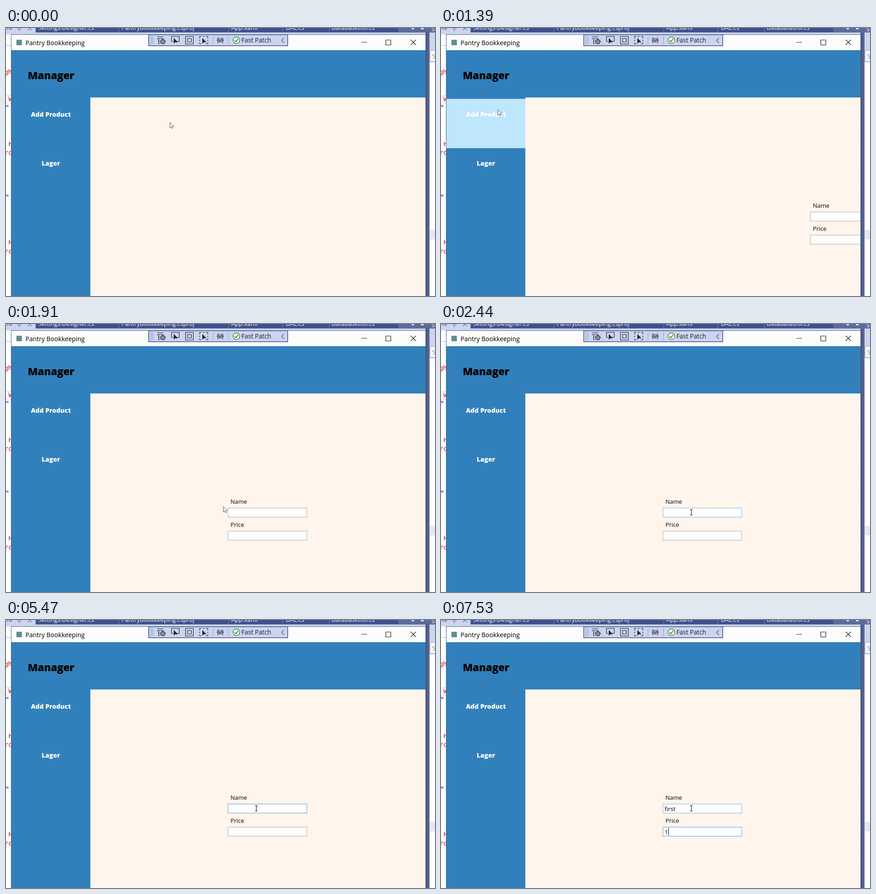
These frames come from a looping animation (946 by 592 pixels, 8 s). An HTML page:

```html
<!DOCTYPE html>
<html lang="en">
<head>
<meta charset="utf-8">
<title>Add product form</title>
<style>
  html, body { margin: 0; width: 100%; height: 100%; overflow: hidden; background: #fff; }
  svg { display: block; width: 946px; height: 592px; }
  text { font: 13.1px "Open Sans", "Noto Sans", sans-serif; white-space: pre; }
  .bold text { font-weight: 800; font-size: 14px; fill: #fff; text-anchor: middle; }
  .bold .heading { font-size: 23px; fill: #000; text-anchor: start; letter-spacing: -.4px; }
  .tabs text { font-size: 13.2px; fill: #fff; }
  .code text { font: 14px "Liberation Mono", monospace; fill: #e00000; text-anchor: end; }
  .code .quote { fill: #1010d0; }
  .line { fill: none; stroke: #222; stroke-width: 1.2; }
  .field { fill: #fff; stroke: #abadb3; }
</style>
</head>
<body>
<svg viewBox="0 0 946 592">
  <defs>
    <linearGradient id="shadow">
      <stop stop-color="#48547f"/>
      <stop offset="1" stop-color="#5d6b99"/>
    </linearGradient>
  </defs>
  <rect width="946" height="592" fill="#fff"/>

  <!-- editor behind the window -->
  <rect width="946" height="14" fill="#5d6b99"/>
  <g class="tabs">
    <rect width="65" height="10" fill="#ccd5f0"/>
    <path d="M66 0h182v9H66zM250 0h240v9H250zM492 0h117v9H492zM611 0h101v9H611zM714 0h151v9H714z" fill="#40508d"/>
    <rect y="10" width="925" height="4" fill="#ccd5f0"/>
    <text x="-2" y="4" style="fill:#222">ml</text>
    <path class="line" d="M25 2h9M29.500 2v5M48 -4l9 9m0-9l-9 9" style="stroke:#667"/>
    <text x="71" y="4">Settings.Designer.cs</text>
    <text x="255" y="4">PantryBookkeeping.csproj</text>
    <text x="497" y="4">App.xaml</text>
    <text x="617" y="4">DAL.cs</text>
    <text x="718" y="4">DatabaseUtil.cs</text>
    <path d="M893 0h8l-4 4zM915 0h6v3h-6z" fill="#dce2f5"/>
  </g>
  <path d="M0 38.500h11" stroke="#a9b3d3"/>
  <rect x="-4" y="149.500" width="20" height="16" fill="none" stroke="#ccc"/>
  <g class="code">
    <text x="13" y="102">gh</text>
    <text x="14" y="162">W</text>
    <text x="7" y="181" class="quote">"</text>
    <text x="14" y="261">H</text>
    <text x="14" y="280">ro</text>
    <text x="7" y="379" class="quote">"</text>
    <text x="14" y="478">H</text>
    <text x="14" y="498">ro</text>
  </g>

  <!-- application window -->
  <rect x="11" y="14" width="914" height="35" fill="#fcfcfc"/>
  <path d="M11 14.500H925" stroke="#55608a"/>
  <rect x="23" y="26" width="12" height="12" fill="#5f8f90"/>
  <text x="43" y="37.500" style="font-size:14px">Pantry Bookkeeping</text>
  <path class="line" d="M784 31.500h12M837.500 26.500h11v11h-11zM892.500 26l11.500 11.500m0-11.500l-11.500 11.500"/>
  <rect x="11" y="49" width="914" height="543" fill="#3180bc"/>
  <rect x="186" y="153.500" width="739" height="439" fill="#fff5ec"/>
  <rect id="highlight" x="12" y="156.500" width="174" height="109" fill="#bee6fd"/>
  <g class="bold">
    <text x="48" y="113" class="heading">Manager</text>
    <text x="99" y="195.500">Add Product</text>
    <text x="99" y="303.500">Lager</text>
  </g>
  <path d="M11.500 14V592" stroke="#3f6288"/>

  <g id="form">
    <text x="6" y="397">Name</text>
    <rect id="nameBox" class="field" x=".5" y="406.500" width="174" height="20"/>
    <text id="nameText" x="4" y="422"></text>
    <text x="6" y="448">Price</text>
    <rect id="priceBox" class="field" x=".5" y="457.500" width="174" height="20"/>
    <text id="priceText" x="4" y="473"></text>
    <path id="caret" d="M0 0v17" stroke="#000"/>
  </g>

  <!-- right edge -->
  <rect x="925" y="10" width="9" height="582" fill="url(#shadow)"/>
  <rect x="934" y="76" width="12" height="516" fill="#fff"/>
  <rect x="934" y="10" width="12" height="66" fill="#ccd5f0"/>
  <rect x="935.500" y="49.500" width="14" height="24" fill="#fff" stroke="#a0a8c4"/>
  <rect x="934" y="446" width="12" height="21" fill="#e6e7ec"/>
  <text x="938" y="7" fill="#fff">S</text>
  <text x="940" y="67" fill="#777">S</text>

  <!-- floating toolbar -->
  <rect x="314.750" y="14.750" width="306.500" height="24.500" fill="#ccd5f0" stroke="#40508d" stroke-width="1.5"/>
  <path d="M319 18v19M323 18v19M321 20v16M325 20v16" stroke="#7583ad" stroke-dasharray="1.500 2.500" stroke-width="1.200"/>
  <g class="line" stroke-linejoin="round">
    <path d="M333 19.500h14M333 23.500h14M336.500 24v10.500h4M337 29h3"/>
    <circle cx="346" cy="30" r="3.700"/>
    <circle cx="346" cy="30" r="5" stroke-width="2" stroke-dasharray="2 1.930"/>
    <circle cx="346" cy="30" r=".800"/>
    <path d="M369 29.500h-4v-11h17v11h-5"/>
    <path d="M396 18.500h17v17h-17zM400.500 23h8v8h-8z"/>
    <path d="M427 23v-4.500h4M434 18.500h4M441 18.500h4V23M427 26v3M445 26v3M427 32v3h4M441 35h4v-3"/>
    <path d="M469 21q-2 0-2 2v2q0 2-2 2q2 0 2 2v2q0 2 2 2M476 21q2 0 2 2v2q0 2 2 2q-2 0-2 2v2q0 2-2 2"/>
    <circle cx="472.500" cy="27" r="3.600"/>
    <path d="M470.500 27l1.500 1.500 3-3"/>
  </g>
  <path d="M370 22v13l3-3.500h6zM433 22v13l3-3.500h6z" fill="#222"/>
  <path d="M456.500 19v16M490.500 19v16" stroke="#8d99bf"/>
  <circle cx="508" cy="27" r="7.300" fill="#fff" stroke="#388a34" stroke-width="1.400"/>
  <path d="M504 27l3 3.500 5-7" fill="none" stroke="#388a34" stroke-width="2"/>
  <text x="519" y="32" style="font-size:13.800px" fill="#1e1e1e">Fast Patch</text>
  <path class="line" d="M613 22l-5.500 5.500 5.500 5.500" style="stroke:#40508d"/>

  <path id="arrow" d="M.5 .5V12.500L3.300 10 5.200 14 7 13.200 5.200 9.200H9Z" fill="#fff" stroke="#334" stroke-width=".8"/>
  <path id="beam" d="M-3 -6h2.200l.8.800.8-.800H3M0 -5.500v11M-3 6h2.200l.8-.800.8.800H3" fill="none" stroke="#111" stroke-width="1.200"/>
</svg>
<script>
const LOOP = 8000;
const HOVER = "#7eb4ea", FOCUS = "#569de5", IDLE = "#abadb3";

// [time, x, y] of the pointer; each position holds until the next
const pointerStops = [
  [0, 361, 208], [400, 228, 182], [550, 132, 177], [700, 125, 180],
  [1780, 300, 290], [1910, 479, 403], [2030, 517, 440], [2320, 545, 418], [2440, 552, 416]
];
const blinkTimes = [3470, 3910, 4460, 5040, 5470, 5850];
const keyTimes = [5850, 6000, 6150, 6300, 6820];

const byId = id => document.getElementById(id);
const [highlight, form, nameBox, nameText, priceBox, priceText, caret, arrow, beam] =
  ["highlight", "form", "nameBox", "nameText", "priceBox", "priceText", "caret", "arrow", "beam"].map(byId);

const passed = (times, t) => times.filter(time => time <= t).length;
const show = (node, on) => node.setAttribute("visibility", on ? "visible" : "hidden");
const move = (node, x, y) => node.setAttribute("transform", `translate(${x} ${y})`);
const textEnd = node => node.textContent ? node.getComputedTextLength() : 0;

function render(t) {
  const [, x, y] = pointerStops.findLast(stop => stop[0] <= t);
  const overField = t >= 2320;
  const typing = t >= 5850 && t < 6940;
  move(arrow, x, y);
  move(beam, x, y);
  show(arrow, !overField);
  show(beam, overField && !typing);
  show(highlight, t >= 550 && t < 1780);

  form.style.display = t >= 1390 ? "" : "none";
  move(form, t < 1520 ? 814 : 489, 0);

  const inPrice = t >= 7090;
  nameBox.style.stroke = !overField ? IDLE : t >= 2880 && !inPrice ? FOCUS : HOVER;
  priceBox.style.stroke = inPrice ? FOCUS : IDLE;
  nameText.textContent = "first".slice(0, passed(keyTimes, t));
  priceText.textContent = t >= 7530 ? "1" : "";

  show(caret, t >= 2880 && passed(blinkTimes, t) % 2 === 0);
  const end = textEnd(inPrice ? priceText : nameText);
  move(caret, Math.round(4 + end) + .5, inPrice ? 459 : 408);
}

function tick() {
  render(performance.now() % LOOP);
  requestAnimationFrame(tick);
}
tick();
</script>
</body>
</html>
```
